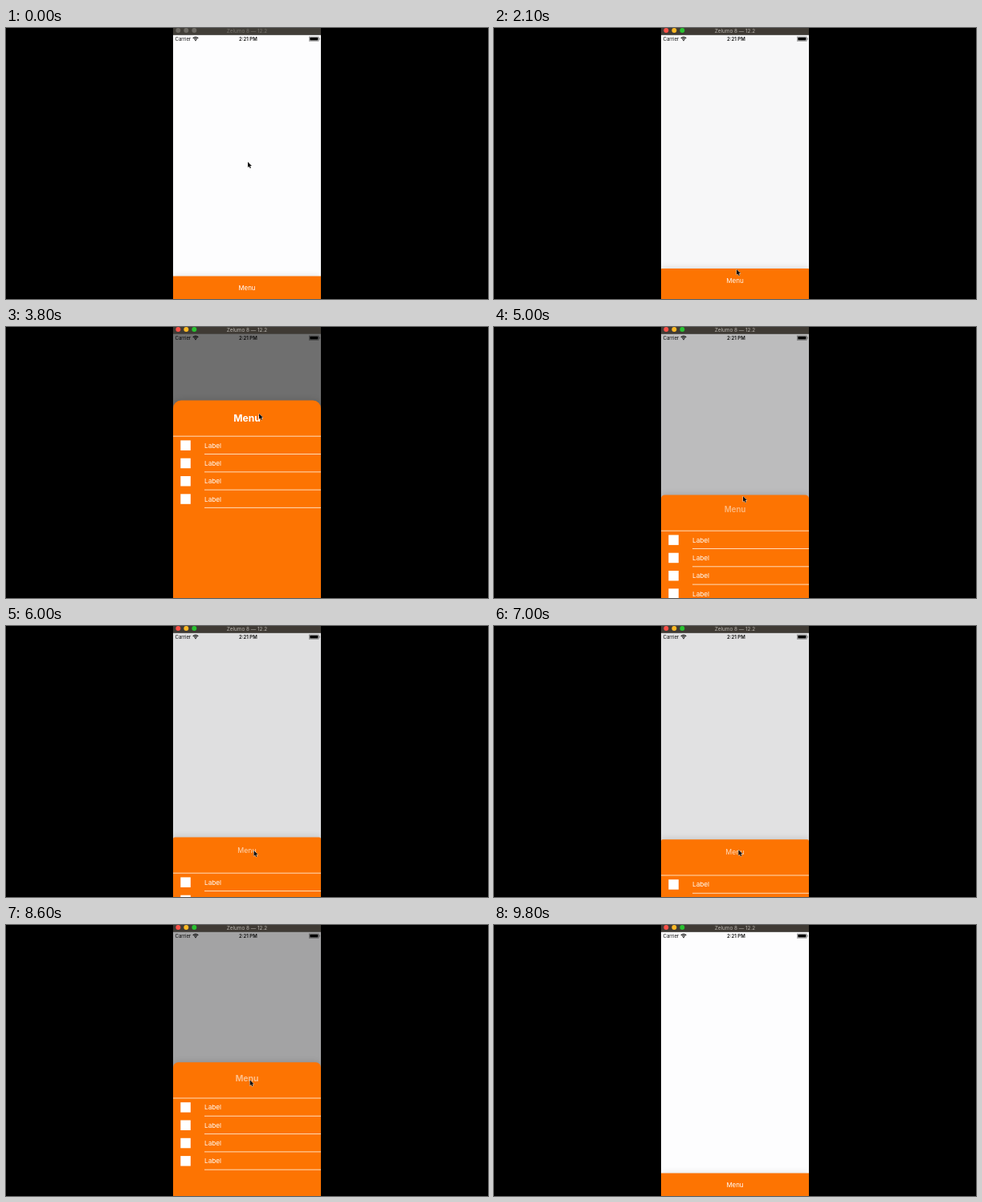
An HTML page with a canvas that plays this animation: 600 px wide and 338 px high, repeating every 9.9 s.

```html
<!DOCTYPE html>
<html lang="en">
<head>
<meta charset="utf-8">
<title>Menu sheet</title>
<style>
  html, body { margin: 0; width: 100%; height: 100%; overflow: hidden; background: #000; }
  canvas { display: block; width: 600px; height: 338px; }
</style>
</head>
<body>
<canvas id="stage"></canvas>
<script>
const W = 600, H = 338, LOOP = 9900, STEP = 100;
const LEFT = 208, RIGHT = 392, BAR = 8.5, CENTER = 300;
const CLOSED = 309.5, OPEN = 91.5;
const ORANGE = '#fd7402';
const FONT = 'Inter, Roboto, sans-serif';

// Each track is a list of [time, value...] stops.
const sheetTrack = [
  [1800, CLOSED], [2100, 300], [2700, 121], [3000, 93], [3200, OPEN],
  [3800, OPEN], [4400, CLOSED], [4700, CLOSED], [5000, 209.5],
  [5400, OPEN], [5700, OPEN], [6000, 263.5], [6300, CLOSED],
  [6800, CLOSED], [7500, OPEN], [7900, OPEN], [8100, 95.5],
  [8700, 190], [9300, CLOSED]
];
const cursorTrack = [
  [0, 301, 167], [1000, 302.5, 323], [1300, 302.5, 324], [1800, 302.5, 324],
  [2100, 302, 301], [2700, 307, 108], [3000, 311, 102], [3800, 315, 108],
  [4400, 312, 310], [4700, 310, 322], [5000, 310, 211], [5400, 309, 104],
  [5700, 308, 110], [6000, 308.5, 280], [6300, 307, 322], [6800, 305, 322],
  [7500, 303, 106], [7900, 302, 112], [8100, 302, 122], [8700, 304, 210],
  [9300, 306, 318]
];

const canvas = document.getElementById('stage');
const ratio = window.devicePixelRatio || 1;
canvas.width = W * ratio;
canvas.height = H * ratio;
const ctx = canvas.getContext('2d');
ctx.scale(ratio, ratio);

// Monotone cubic interpolation: smooth through the stops, never overshooting.
function sample(track, time, column = 1) {
  const last = track.length - 1;
  if (time <= track[0][0]) return track[0][column];
  if (time >= track[last][0]) return track[last][column];
  const i = track.findIndex(stop => stop[0] > time) - 1;
  const slope = k => k < 0 || k >= last ? 0
    : (track[k + 1][column] - track[k][column]) / (track[k + 1][0] - track[k][0]);
  const tangent = k => {
    const a = slope(k - 1), b = slope(k);
    return a * b > 0 ? 2 * a * b / (a + b) : 0;
  };
  const span = track[i + 1][0] - track[i][0];
  const u = (time - track[i][0]) / span, v = 1 - u;
  return track[i][column] * (1 + 2 * u) * v * v
    + track[i + 1][column] * (3 - 2 * u) * u * u
    + span * u * v * (tangent(i) * v - tangent(i + 1) * u);
}

function rect(x, y, w, h, color) {
  ctx.fillStyle = color;
  ctx.fillRect(x, y, w, h);
}

function disc(x, y, r, color) {
  ctx.fillStyle = color;
  ctx.beginPath();
  ctx.arc(x, y, r, 0, Math.PI * 2);
  ctx.fill();
}

// The vertical position is the middle of the capital letters.
function text(string, x, y, size, color, weight = 400, align = 'left') {
  ctx.font = `${weight} ${size}px ${FONT}`;
  ctx.textAlign = align;
  ctx.fillStyle = color;
  ctx.fillText(string, x, y + size * 0.364);
}

function drawTitleBar(focused) {
  rect(LEFT, 0, RIGHT - LEFT, BAR, focused ? '#3f3a34' : '#413e38');
  const lights = focused ? ['#fc5148', '#fdb924', '#28c231'] : Array(3).fill('#6c6963');
  lights.forEach((color, i) => disc(214.3 + i * 10, 3, 3, color));
  text('Zelumo 8 — 12.2', CENTER, 3.2, 6.4, focused ? '#bab6b0' : '#77736d', 400, 'center');
}

function drawStatusBar() {
  text('Carrier', 210.5, 13.6, 6, '#111');
  text('2:21 PM', 301.3, 13.6, 6, '#111', 600, 'center');
  ctx.strokeStyle = '#111';
  ctx.lineWidth = 1.1;
  for (const r of [2.7, 4.6]) {
    ctx.beginPath();
    ctx.arc(236, 16, r, -Math.PI * 0.75, -Math.PI * 0.25);
    ctx.stroke();
  }
  disc(236, 15.3, 0.9, '#111');
  ctx.lineWidth = 0.5;
  ctx.strokeStyle = '#666';
  ctx.strokeRect(377.5, 11, 11.8, 5.2);
  rect(378.3, 11.7, 10.2, 3.8, '#000');
  rect(389.8, 12.7, 0.8, 1.8, '#666');
}

function drawSheet(top, open) {
  const radius = 10 * open;
  ctx.save();
  ctx.shadowColor = 'rgba(0,0,0,0.16)';
  ctx.shadowBlur = 9 * ratio;
  ctx.fillStyle = ORANGE;
  ctx.beginPath();
  ctx.roundRect(LEFT, top, RIGHT - LEFT, 300, [radius, radius, 0, 0]);
  ctx.fill();
  ctx.restore();

  const titleY = top + 14.5 + 7.7 * open;
  const grow = 1 + 0.53 * open;
  ctx.globalAlpha = (1 - open) ** 1.7;
  text('Menu', CENTER, titleY, 7.9 * grow, '#fff', 400, 'center');
  ctx.globalAlpha = open ** 1.7;
  text('Menu', CENTER, titleY, 7.9 * grow, '#fff', 700, 'center');
  ctx.globalAlpha = 1;

  const line = '#ffdcbb';
  rect(LEFT, top + 44.2, RIGHT - LEFT, 1, line);
  for (let i = 0; i < 4; i++) {
    const y = top + 56.2 + i * 22.3;
    rect(217.3, y - 6.3, 12.5, 12.5, '#fff');
    text('Label', 247, y, 8.2, '#fff');
    rect(247, y + 10.3, RIGHT - 247, 1, line);
  }
}

function drawCursor(x, y) {
  ctx.save();
  ctx.translate(x, y);
  const arrow = new Path2D('M0 0V7L1.6 5.6L2.7 8L3.9 7.5L2.9 5.1H5Z');
  ctx.lineWidth = 0.9;
  ctx.lineJoin = 'round';
  ctx.strokeStyle = 'rgba(255,255,255,0.8)';
  ctx.stroke(arrow);
  ctx.fillStyle = '#111';
  ctx.fill(arrow);
  ctx.restore();
}

function draw(time) {
  const top = sample(sheetTrack, time);
  const open = (CLOSED - top) / (CLOSED - OPEN);
  rect(0, 0, W, H, '#000');

  ctx.save();
  ctx.beginPath();
  ctx.rect(LEFT, 0, RIGHT - LEFT, H);
  ctx.clip();
  rect(LEFT, BAR, RIGHT - LEFT, H - BAR, '#fdfdfe');
  drawStatusBar();
  rect(LEFT, BAR, RIGHT - LEFT, H - BAR, `rgba(0,0,0,${0.56 * open})`);
  drawSheet(top, open);
  drawTitleBar(time >= 1800);
  ctx.restore();

  if (time < 9800) drawCursor(sample(cursorTrack, time, 1), sample(cursorTrack, time, 2));
}

const start = performance.now();
function tick() {
  const elapsed = (performance.now() - start) % LOOP;
  draw(Math.floor(elapsed / STEP) * STEP);
  requestAnimationFrame(tick);
}
tick();
</script>
</body>
</html>
```
